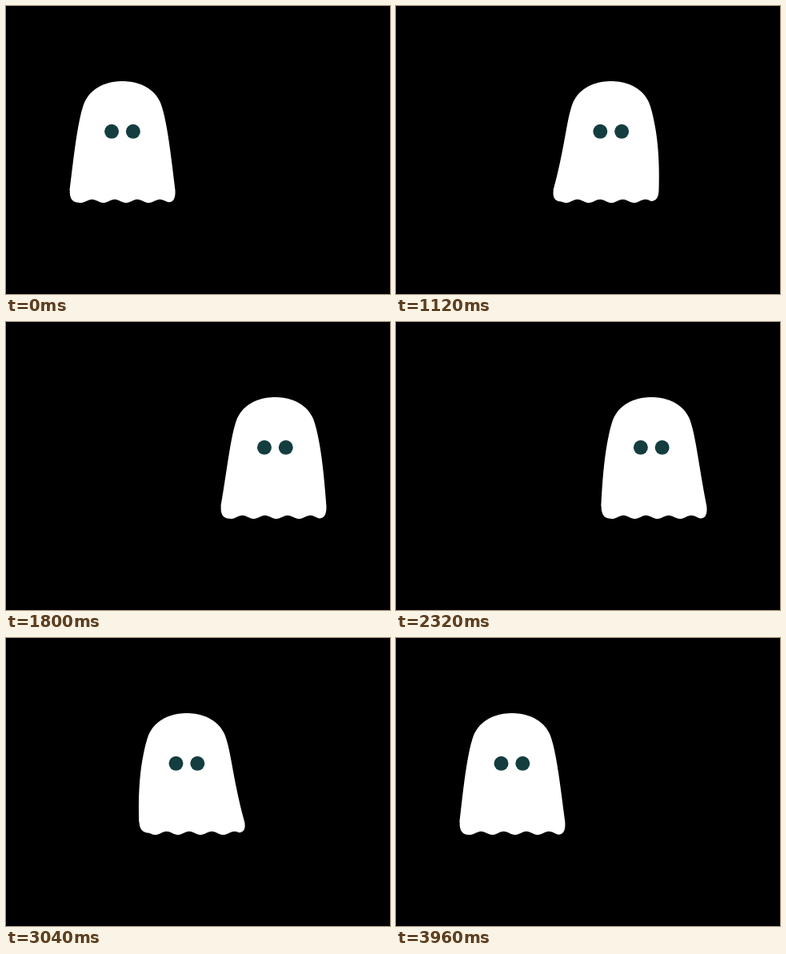
Write an HTML page with a canvas that moves like this. It is 480 px wide and 360 px high and loops after 4000 ms.

```html
<!DOCTYPE html>
<html lang="en">
<head>
<meta charset="utf-8">
<title>Ghost</title>
<style>
  html, body { margin: 0; width: 100%; height: 100%; overflow: hidden; background: #000; }
  canvas { display: block; width: 480px; height: 360px; }
</style>
</head>
<body>
<canvas id="stage" width="480" height="360"></canvas>
<script>
const ctx = document.getElementById('stage').getContext('2d');
const LOOP = 4000;
const STEP = 40;
const TAU = Math.PI * 2;
const PERIOD = 28.3; // width of one scallop

// Half outline from crown to hem, relative to the middle of the face
const CROWN = [[0, 94], [22, 94], [41, 104], [48, 122]];
const FLANK = [[48, 122], [56.5, 145], [61.5, 195], [66, 230]];

// Drift of the scallops under the cloth: [time, shift]
const DRIFT = [[0, 0], [640, -2], [1120, -4], [1800, -3], [2720, 7.5], [3360, 18], [LOOP, PERIOD]];

function bezier([a, b, c, d], u) {
  const v = 1 - u;
  return [0, 1].map(i =>
    v * v * v * a[i] + 3 * v * v * u * b[i] + 3 * v * u * u * c[i] + u * u * u * d[i]);
}

function samples(curve, n) {
  return Array.from({ length: n + 1 }, (_, i) => bezier(curve, i / n));
}

const side = [...samples(CROWN, 24), ...samples(FLANK, 32).slice(1)];

function track(keys, t) {
  const i = Math.max(1, keys.findIndex(k => k[0] >= t));
  const [t0, a] = keys[i - 1], [t1, b] = keys[i];
  return a + (b - a) * (t - t0) / (t1 - t0);
}

function faceX(t) {
  const a = TAU * (t + 71) / LOOP;
  return 241.7 - 95.4 * Math.cos(a) - 1.5 * Math.cos(3 * a);
}

function dot(x, y, r) {
  ctx.beginPath();
  ctx.arc(x, y, r, 0, TAU);
  ctx.fill();
}

function drawBody(t) {
  const lag = -8 * Math.sin(TAU * t / LOOP);
  const low = 4.5 + track(DRIFT, t);
  const bend = y => lag * (Math.max(0, y - 150) / 90) ** 2;
  const hem = x => 243.9 + 2.1 * Math.cos(TAU * (x - low) / PERIOD);
  const left = -54.5 + lag * 0.95;
  const right = 57.5 + lag * 0.95;

  ctx.beginPath();
  for (const [x, y] of side) ctx.lineTo(x + bend(y), y);
  ctx.quadraticCurveTo(67 + lag * 0.95, hem(right), right, hem(right));
  for (let x = right; x > left; x--) ctx.lineTo(x, hem(x));
  ctx.lineTo(left, hem(left));
  ctx.quadraticCurveTo(-66.5 + lag * 0.95, hem(left), -65.7 + bend(230), 230);
  for (const [x, y] of [...side].reverse()) ctx.lineTo(-x + bend(y), y);
  ctx.closePath();
  ctx.fill();
}

function draw(t) {
  ctx.fillStyle = '#000';
  ctx.fillRect(0, 0, 480, 360);
  ctx.save();
  ctx.translate(faceX(t), 0);
  ctx.fillStyle = '#fff';
  drawBody(t);
  ctx.fillStyle = '#143d40';
  dot(-13.4, 156.8, 9);
  dot(13.4, 156.8, 9);
  ctx.restore();
}

const start = performance.now();
function tick() {
  const t = (performance.now() - start) % LOOP;
  draw(Math.floor(t / STEP) * STEP);
  requestAnimationFrame(tick);
}
tick();
</script>
</body>
</html>
```
